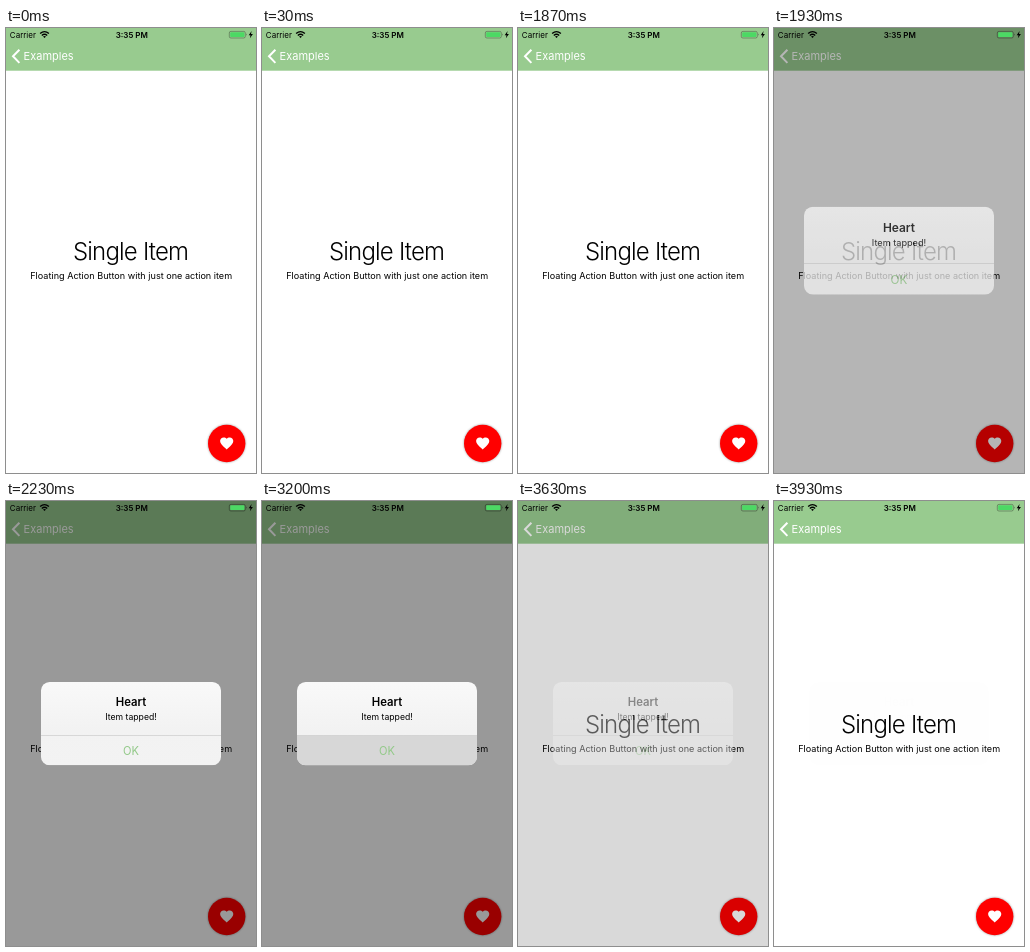
Write an HTML page that moves like this. It is 250x445 px and loops after 3.96 s.

```html
<!DOCTYPE html>
<html lang="en">
<head>
<meta charset="utf-8">
<title>Single Item</title>
<style>
  html, body { margin: 0; width: 100%; height: 100%; overflow: hidden; background: #fff; }
  svg { display: block; width: 100%; height: 100%; }
  text { font-family: Inter, Roboto, sans-serif; }
  .mid { text-anchor: middle; }
  .semi { font-weight: 600; }
  #fab { filter: drop-shadow(0 .7px 1px rgba(0, 0, 0, .4)); }
</style>
</head>
<body>
<svg viewBox="0 0 250 445">
  <defs>
    <linearGradient id="glass" x1="0" y1="0" x2="0" y2="1">
      <stop offset="0" stop-color="#f9f9f9"/>
      <stop offset=".6" stop-color="#f2f2f2"/>
      <stop offset="1" stop-color="#f3f3f3"/>
    </linearGradient>
    <clipPath id="card"><rect x="35" y="181" width="180" height="83.3" rx="8.6"/></clipPath>
  </defs>

  <rect width="250" height="445" fill="#fff"/>
  <rect width="250" height="42.7" fill="#98cb8f"/>
  <path d="M13.4 21.7 L7 28.3 L13.4 34.9" fill="none" stroke="#fff" stroke-width="2"/>
  <text x="17.6" y="32.2" font-size="11" fill="#fff">Examples</text>

  <text class="mid" x="124.6" y="231.6" font-size="24" font-weight="300" letter-spacing="-.8">Single Item</text>
  <text class="mid" x="125.2" y="251.2" font-size="9.1">Floating Action Button with just one action item</text>

  <circle id="fab" cx="220.7" cy="415.5" r="18.7"/>
  <path transform="translate(220.7 415.5)" fill="#fff"
    d="M0 6 L-1 5.1 C-4.4 2 -6.6 0 -6.6 -2.5 C-6.6 -4.6 -5 -6.1 -3 -6.1 C-1.8 -6.1 -.7 -5.6 0 -4.7 C.7 -5.6 1.8 -6.1 3 -6.1 C5 -6.1 6.6 -4.6 6.6 -2.5 C6.6 0 4.4 2 1 5.1 Z"/>

  <rect id="dim" width="250" height="445"/>

  <g id="alert">
    <g clip-path="url(#card)">
      <rect x="35" y="181" width="180" height="83.3" fill="url(#glass)"/>
      <rect id="pressedRow" x="35" y="234.7" width="180" height="30" fill="#d7d7d7"/>
      <rect x="35" y="234.4" width="180" height=".6" fill="#c6c6c6"/>
    </g>
    <text class="mid semi" x="125" y="205.3" font-size="11.3">Heart</text>
    <text class="mid" x="125" y="218.6" font-size="8.67">Item tapped!</text>
    <text class="mid" x="125" y="254" font-size="11.1" fill="#92c988">OK</text>
  </g>

  <g id="statusBar">
    <text x="3.8" y="9.7" font-size="8">Carrier</text>
    <text class="mid semi" x="125.8" y="9.7" font-size="8">3:35 PM</text>
    <g fill="none" stroke="#000" stroke-width="1.35">
      <path d="M34.1 5.6 Q38.5 1.7 42.9 5.6"/>
      <path d="M35.8 7.4 Q38.5 5 41.2 7.4"/>
    </g>
    <path d="M37 8.5 Q38.5 7.4 40 8.5 L38.5 10.1 Z"/>
    <rect x="223.3" y="3.4" width="16" height="6.6" rx="1.6" fill="none" stroke="#000" stroke-opacity=".5" stroke-width=".6"/>
    <rect x="224.2" y="4.3" width="14.2" height="4.8" rx=".8" fill="#4cd964"/>
    <path d="M240.2 5.6 Q241.4 6.7 240.2 7.8 Z" fill-opacity=".5"/>
    <path d="M245.6 3 L242.7 7.2 H244.5 L243.9 10.3 L246.9 6 H245 Z"/>
  </g>
</svg>
<script>
  const LOOP = 3960;
  const PRESS = 1230, RELEASE = 1670;
  const ALERT_START = 1810, ALERT_VISIBLE = 1900;
  const OK_PRESS = 3200, OK_RELEASE = 3500, DISMISS = 3530;
  const STIFFNESS = 0.021;

  const byId = id => document.getElementById(id);
  const fab = byId('fab'), dim = byId('dim'), alertBox = byId('alert'), pressedRow = byId('pressedRow');
  const between = (t, from, to) => t >= from && t < to;

  // Critically damped spring from 0 to 1.
  function spring(ms) {
    const x = Math.max(0, ms) * STIFFNESS;
    return 1 - Math.exp(-x) * (1 + x);
  }

  function draw(t) {
    const shown = t < ALERT_VISIBLE ? 0 : spring(t - ALERT_START);
    const opacity = shown * (1 - spring(t - DISMISS));
    const scale = 1.2 - 0.2 * shown;

    // The touch-up colour eases back over 100 ms.
    const pressed = t < PRESS ? 0 : Math.min(1, Math.max(0, 1 - (t - RELEASE) / 100));
    fab.setAttribute('fill', `rgb(${255 - 31 * pressed}, 0, 0)`);
    dim.setAttribute('opacity', 0.4 * opacity);
    alertBox.setAttribute('opacity', opacity);
    alertBox.setAttribute('transform', `translate(125 222.6) scale(${scale}) translate(-125 -222.6)`);
    pressedRow.setAttribute('opacity', between(t, OK_PRESS, OK_RELEASE) ? 1 : 0);
  }

  const start = performance.now();
  function tick() {
    draw((performance.now() - start) % LOOP);
    requestAnimationFrame(tick);
  }
  tick();
</script>
</body>
</html>
```
